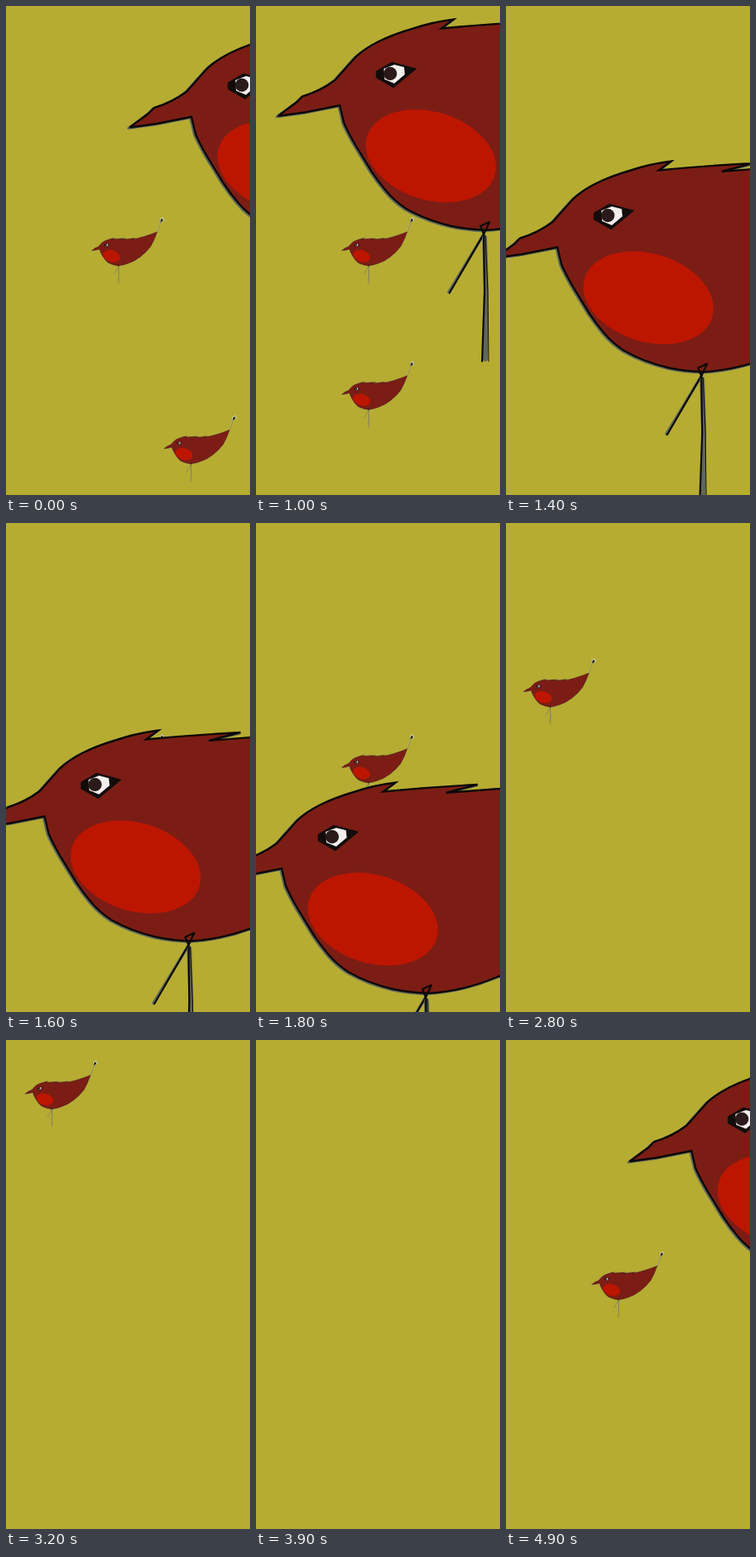
Recreate the animation shown at these times as an HTML page. Size 300 by 600 pixels, loop 5400 ms.

```html
<!DOCTYPE html>
<html lang="en">
<head>
<meta charset="utf-8">
<title>Birds</title>
<style>
  html, body { margin: 0; width: 100%; height: 100%; overflow: hidden; background: #b6ac32; }
  svg { display: block; width: 100%; height: 100%; }
  .shade { fill: none; stroke: var(--shade, #5f675c); stroke-linejoin: round; stroke-linecap: round; }
  .ink { fill: none; stroke: #0c0807; stroke-width: 2.2; stroke-linejoin: round; stroke-linecap: round; }
  .body { fill: #7b1d15; stroke: #0c0807; stroke-width: 2.4; stroke-linejoin: miter; }
  .small { --shade: #c9c9ae; }
</style>
</head>
<body>
<svg viewBox="0 0 300 600" preserveAspectRatio="none">
  <defs>
    <path id="outline" d="M27 135 L50 118 57 111 Q80 104 97 91 L122 63 Q134 52 150 44 Q168 35 192 28
      Q215 20 243 16.5 L228 27.5 Q285 22 344 19 L305 29 371 24 430 17 406 27 Q500 15 642 -42
      Q615 35 581 95 Q540 150 482 194 Q430 235 368 255 Q325 273 282 275 Q258 274 240 270
      Q210 263 185 249 Q170 239 160 227 Q150 215 142 203 L123 172 Q112 153 108 143 L103 122 60 130.5 Z"/>
    <g id="bird">
      <path class="shade" stroke-width="7" d="M642 -42 L650 -75 672 -125"/>
      <path class="ink" d="M642 -42 L654 -78 674 -128 M662 -150 L674 -128 M704 -150 L674 -128"/>
      <path class="shade" stroke-width="9" d="M674 -132 L668 -152 690 -174 704 -152 Z"/>
      <path fill="#0c0807" d="M672 -132 L676 -155 690 -166 692 -145 Z"/>
      <use href="#outline" class="shade" stroke-width="3" x="-1.5" y="1"/>
      <use href="#outline" class="body"/>
      <ellipse cx="215" cy="184" rx="82" ry="54" transform="rotate(17 215 184)" fill="#bd1600"/>
      <path fill="#120c0b" stroke="#120c0b" d="M148 80 L167 69 197 77 169 100 148 88 Z"/>
      <path fill="#f3eeee" d="M157 77 L170 72 182 75 183 84 170 95 158 90 Z"/>
      <circle cx="165" cy="83" r="8.3" fill="#2a1a19"/>
      <path class="shade" stroke-width="3.5" d="M280 280 L237 351"/>
      <path class="ink" d="M281 278 L238 352"/>
      <path class="shade" stroke-width="6" d="M281 284 L283 350 282 433"/>
      <path class="ink" d="M276 270 L287 265 280 280 Z M280 279 L281 350 278 436"/>
      <path class="ink" stroke-width="1" style="stroke-width:1" d="M282 282 L285 350 286 436"/>
    </g>
    <g id="mini" class="small" transform="scale(.13158) translate(-26 178.6)">
      <use href="#bird"/>
    </g>
  </defs>
  <rect width="300" height="600" fill="#b6ac32"/>
  <use class="mini" href="#mini"/>
  <use class="mini" href="#mini"/>
  <use id="big" href="#bird"/>
</svg>
<script>
const LOOP = 5400;
const home = [105, 259];

// Each pose: start time, offset of the big bird (or null), corners of the small birds
const poses = [
  [0, [125, 14], home, [194, 502]],
  [1000, [0, 0], home, [105, 435.5]],
  [1200, [-24, 110], home],
  [2200, [-411, 504], home],
  [2400, [-520, 506], home],
  [2600, [-615, 452]],
  [2800, null, [21, 166]],
  [3000, null, [193, 360], [70, 148]],
  [3200, null, [23, 25]],
  [3400, null, [185, 424]],
  [3900, null],
  [4400, null, [176, 63]],
  [4900, [125, 14], home]
];

const big = document.getElementById('big');
const minis = document.querySelectorAll('.mini');

function place(el, pos) {
  el.setAttribute('visibility', pos ? 'visible' : 'hidden');
  if (pos) el.setAttribute('transform', `translate(${pos[0]} ${pos[1]})`);
}

function draw(t) {
  let [start, pos, ...spots] = poses.findLast(p => p[0] <= t);
  if (start === 1200) {
    // even slide in steps of 100 ms
    const n = Math.min(8, Math.floor((t - start) / 100));
    pos = [pos[0] - 7.9 * n, pos[1] + 32 * n];
  }
  place(big, pos);
  minis.forEach((el, i) => place(el, spots[i]));
}

const t0 = performance.now();
function tick() {
  draw((performance.now() - t0) % LOOP);
  requestAnimationFrame(tick);
}
draw(0);
requestAnimationFrame(tick);
</script>
</body>
</html>
```
